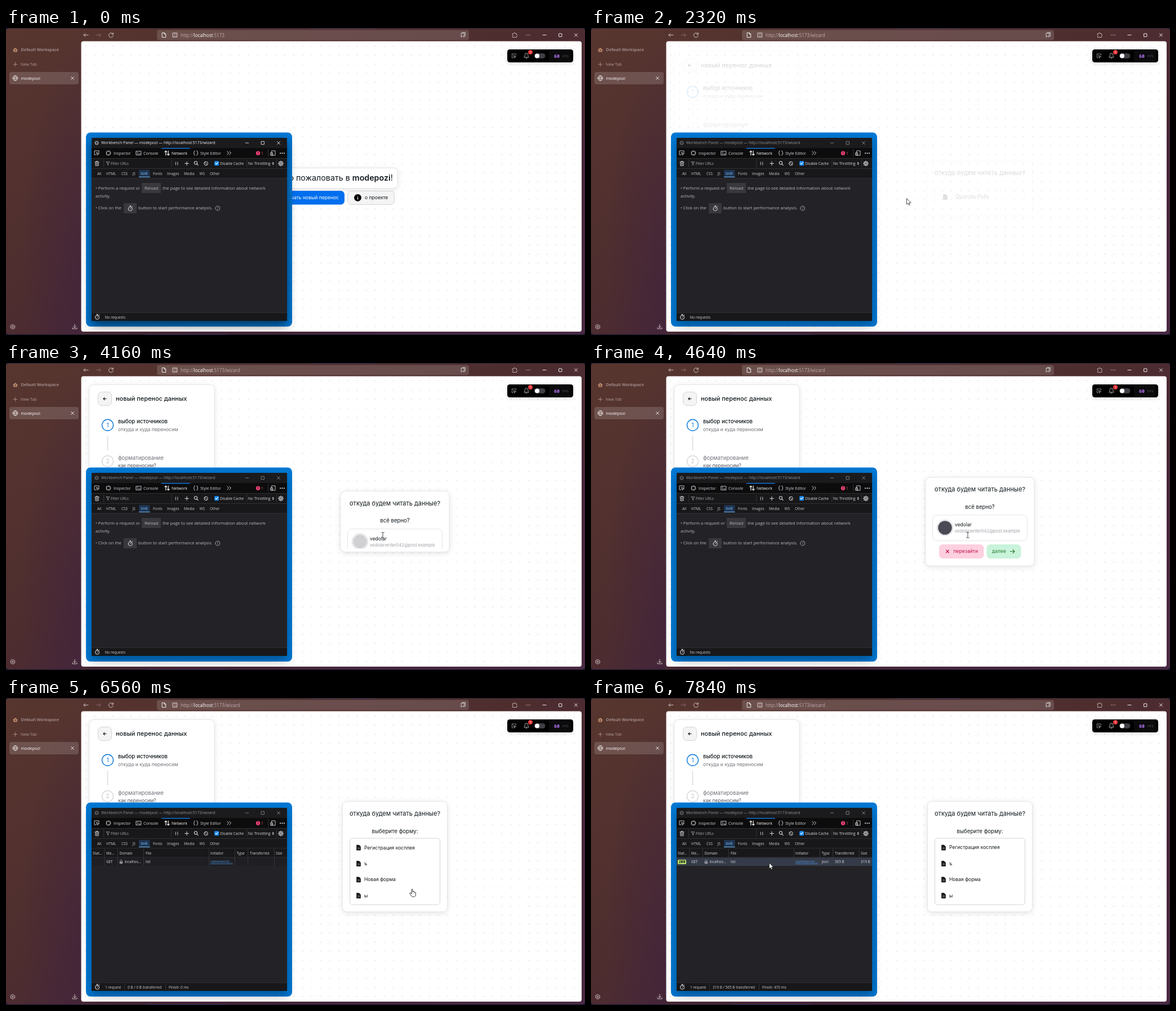
An HTML page for the animation above (8 s loop, 1028 by 545 pixels).

```html
<!DOCTYPE html>
<html lang="ru">
<head>
<meta charset="utf-8">
<style>
html, body { margin: 0; width: 100%; height: 100%; overflow: hidden; background: #1d1b33; }
svg { display: block; }
text { font-family: Inter, sans-serif; white-space: pre; }
text.ui { font-family: "Open Sans", "Noto Sans", sans-serif; }
text.mono { font-family: "Noto Sans Mono", monospace; }
.card { fill: #fff; stroke: #e6e6e9; filter: drop-shadow(0 2px 5px #0000001c); }
</style>
</head>
<body>
<svg id="stage" width="1028" height="545" viewBox="0 0 1028 545"></svg>
<script>
const APP = 'modepozi';
const $ = id => document.getElementById(id);

// Drawing helpers: y of a text is its visual middle
const text = (x, y, size, str, fill = '#11181c', more = '') =>
  `<text x="${x}" y="${y + size * .35}" font-size="${size}" fill="${fill}" ${more}>${str}</text>`;
const ui = (x, y, size, str, fill = '#d7d7db', more = '') => text(x, y, size, str, fill, 'class="ui" ' + more);
const rect = (x, y, w, h, r, fill, more = '') =>
  `<rect x="${x}" y="${y}" width="${w}" height="${h}" rx="${r}" fill="${fill}" ${more}/>`;
const circle = (x, y, r, fill, more = '') => `<circle cx="${x}" cy="${y}" r="${r}" fill="${fill}" ${more}/>`;
const icon = (x, y, d, color = '#d7d7db', w = 1, fill = 'none') =>
  `<path transform="translate(${x} ${y})" d="${d}" fill="${fill}" stroke="${color}" stroke-width="${w}" stroke-linecap="round" stroke-linejoin="round"/>`;
const stroke = (color, w = 1) => `stroke="${color}" stroke-width="${w}"`;
const mid = 'text-anchor="middle"';
const ring = r => `M${-r} 0a${r} ${r} 0 1 0 ${2 * r} 0a${r} ${r} 0 1 0 ${-2 * r} 0`;

const CROSS = 'M-2.5-2.5l5 5m0-5l-5 5', LEFT = 'M4 0h-8m3-3l-3 3l3 3', RIGHT = 'M-4 0h8m-3-3l3 3l-3 3';
const WATCH = ring(3.6) + 'M0 0l1.3-1.5M-1.2-5.2h2.4M0-5v1.3M3-3.6l.8-.8';
const GLOBE = ring(4.3) + 'M-4.3 0h8.6M0-4.3c-2.7 2.7-2.7 6 0 8.6c2.7-2.6 2.7-5.9 0-8.6';
const GEAR = ring(1.6) + ring(3.3) + 'M0-4.6v1.2M0 3.4v1.2M-4.6 0h1.2M3.4 0h1.2M-3.2-3.2l.8.8M2.4 2.4l.8.8M-3.2 3.2l.8-.8M2.4-2.4l.8-.8';
const file = (x, y) => icon(x, y, 'M-3.2-4.4h4l2.6 2.6v6.4h-6.6z', '#18181b', .8, '#18181b')
  + icon(x, y, 'M-1.3.3h3M-1.3 2h3', '#aaa', .7);

const chrome = () => {
  const c = '#d9cccb', dim = '#b09a99';
  return rect(540, 0, 115, 1, 0, '#232c66') + rect(250, 544, 140, 1, 0, '#242a60')
    + rect(0, .8, 1028, 543, 5, 'url(#frame)') + rect(0, .8, 134, 543, 5, 'url(#tint)')
    + icon(16.5, 39, 'M-3.5 0l3.5-3l3.5 3M-2.5 0v3h5v-3', '#c99a7a', 1.2, '#8d5c48')
    + ui(26.5, 38.5, 7.4, 'Default Workspace', dim, 'font-weight="600"')
    + icon(16.5, 64.5, 'M-3.5 0h7M0-3.5v7', dim, .8) + ui(26, 64.5, 7.2, 'New Tab', dim)
    + rect(6, 78, 123, 22, 4, '#ffffff26') + icon(16.5, 89, GLOBE, '#f3ecec', .9)
    + ui(26.5, 89.5, 7.4, APP, '#fff') + icon(118, 89, CROSS, '#f3ecec', .9)
    + icon(12, 530.5, 'M0-4l3.6 2v4l-3.6 2l-3.6-2v-4z' + ring(1.4), c, .9)
    + icon(122, 530, 'M0-4v6m-2.3-2.3l2.3 2.3l2.3-2.3M-4 2v2h8v-2', c, .9)
    + icon(142, 12.5, LEFT, c, .9) + icon(164, 12.5, RIGHT, '#8a6d6d', .9)
    + icon(186.5, 12.5, 'M3.6-1.5a4 4 0 1 0 .3 2.6M3.8-4.2v2.8h-2.8', c, .9)
    + rect(268, 3.5, 554, 18, 4, '#ffffff24')
    + icon(280.5, 12.5, 'M-3-4h3.6l2.6 2.6v5.4h-6.2zM.6-4v2.6h2.6', '#fff', .9)
    + icon(300, 12.5, 'M-3.7-3.7h7.4v7.4h-7.4zM-1.6-1.7h1M1-1.7h.8M-1.6 1.5h1M1 1.5h.8', '#e9dfdf', .9)
    + `<text class="ui" x="310" y="15.9" font-size="8.05" fill="#bfaaaa">http://<tspan fill="#fff">localhost</tspan>:5173<tspan id="path"></tspan></text>`
    + icon(812, 12.5, 'M-3.5-3.5h5v7l-2.5-2l-2.5 2zM-1.5-3.5v-1h5v6.5', '#eee', .8)
    + icon(903, 12.5, 'M-3.5-2.5h2a1.5 1.5 0 0 1 3 0h2v2.2a1.5 1.5 0 0 1 0 2.8v1.5h-7v-2a1.5 1.5 0 0 0 0-2.6z', c, .8)
    + [-3, 0, 3].map(d => circle(927 + d, 12.5, .7, c)).join('')
    + icon(956, 12.5, 'M-3 0h6', '#fff', .9) + rect(981.5, 10, 5.4, 5.4, .5, 'none', stroke('#fff', .9)) + icon(1012, 12.5, CROSS, '#fff', .9)
    + rect(133.5, 23.5, 888.5, 515.5, 4, '#fff') + rect(133.5, 24, 888.5, 515, 4, 'url(#dots)');
};

const home = () =>
  rect(460, 248.5, 235, 36, 7, '', 'class="card"')
  + text(577.5, 266.5, 14.25, `добро пожаловать в <tspan font-weight="600">${APP}</tspan>!`, '#11181c', mid)
  + `<g id="start">${rect(465, 289, 136, 24.5, 6.5, '#006fee')}${text(591, 301, 8.56, 'начать новый перенос', '#fff', 'text-anchor="end"')}</g>`
  + rect(606.5, 289.5, 83, 24, 6.5, '#f4f4f5', stroke('#d4d4d8'))
  + circle(624.5, 301.3, 6.4, '#000') + icon(624.5, 301.3, 'M0-.3v3M0-2.7v.1', '#fff', 1.3)
  + text(637, 301, 8.56, 'о проекте');

const steps = () =>
  rect(148, 38.5, 222, 480, 8, '', 'class="card"')
  + rect(163.5, 51.5, 24, 24, 6.5, '#f4f4f5', stroke('#d4d4d8')) + icon(175.5, 63.5, 'M2.6 0h-5.2m2.2-2.2l-2.2 2.2l2.2 2.2', '#18181b', 1.1)
  + text(195, 63.5, 10.95, 'новый перенос данных', '#11181c', 'font-weight="500"')
  + circle(180.5, 110.3, 10, '#fff', stroke('#0878dc', 1.4)) + text(180.5, 110.3, 10, '1', '#0878dc', mid)
  + text(199, 104, 9.63, 'выбор источников', '#11181c', 'font-weight="500"')
  + text(199, 118, 8.56, 'откуда и куда переносим', '#71717a')
  + rect(180, 130, 1.2, 25, 0, '#d4d4d8')
  + circle(180.5, 174.5, 10, '#fff', stroke('#d9d9de', 1.4)) + text(180.5, 174.5, 10, '2', '#c2c2c8', mid)
  + text(199, 168.5, 9.63, 'форматирование', '#71717a') + text(199, 182.5, 8.56, 'как переносим?', '#52525b');

const toolbar = () =>
  rect(890, 38, 117, 23, 4.5, '#000', 'style="filter:drop-shadow(0 2px 3px #0002)"')
  + icon(902, 49.5, 'M-3.5-3.5h7v2M-3.5-3.5v7h2', '#999', .9) + icon(902, 49.5, 'M-.5-.5l4 1.5l-1.8.7l-.8 1.8z', '#ddd', .7)
  + icon(924, 49.5, 'M-4 2.2c1.5-1.5 1-3 1.3-4.3a2.7 2.7 0 0 1 5.4 0c.3 1.3-.2 2.8 1.3 4.3zM-1 4h2', '#bbb', .9)
  + circle(931, 43, 4, '#e5393f') + text(931, 43, 4.8, '1', '#fff', mid)
  + rect(938, 45, 19.5, 9, 4.5, '#3f3f46') + circle(943, 49.5, 4, '#fff')
  + rect(964, 41, 39, 17.5, 3, '#0b0b0d')
  + text(973, 50, 8.2, '60', '#b673f0', 'id="fps" class="mono" font-weight="700"')
  + text(988, 50, 6, 'FPS', '#55555c', 'class="mono"');

const devtools = () => {
  const line = (x, y, h = 14) => rect(x, y, .8, h, 0, '#3b3b40');
  const filters = { All: 162, HTML: 178, CSS: 205, JS: 224.5, XHR: 239, Fonts: 261, Images: 286, Media: 316, WS: 343.5, Other: 362 };
  return rect(142, 185.5, 366, 344.5, 8, '#0078d4')
    + `<g id="shadow">${rect(152, 203, 347, 325, 4, '#000', 'style="filter:blur(9px)"')}</g>`
    + rect(152, 195, 347, 325, 2, '#232327') + rect(152, 195, 347, 18, 2, '#1b1b1e')
    + `<g id="title">${circle(161, 204, 3.6, '#8a8a8f')}${circle(161, 204, 1.4, '#1b1b1e')}`
    + ui(169, 204, 7, `Workbench Panel — ${APP} — http://localhost:5173/wizard`, '#f4f4f6')
    + icon(428, 204, 'M-2.7 0h5.4', '#fff', .8) + rect(453, 201.3, 5.4, 5.4, .5, 'none', stroke('#fff', .8)) + icon(484, 204, CROSS, '#fff', .8) + '</g>'
    + rect(152, 213, 347, 18, 0, '#0c0c0d') + rect(276, 213, 50.5, 1.2, 0, '#0a84ff')
    + icon(161, 222, 'M4-1v-3h-8v7h3M0-1l4.5 1.8l-2 .8l-.8 2z', '#d7d7db', .9)
    + icon(182, 222, 'M-3-3h6v6h-6zM0-4.3v1M0 3.3v1M-4.3 0h1M3.3 0h1', '#d7d7db', .9) + ui(191, 222.5, 7, 'Inspector')
    + icon(235.5, 222, 'M-4.3-3.2h8.6v6.6h-8.6zM-2.6-1.4l1.7 1.5l-1.7 1.5M.5 1.6h2', '#d7d7db', .9) + ui(244, 222.5, 7, 'Console')
    + icon(286, 222, 'M-2.2 4v-8m-2 2.2l2-2.2l2 2.2M2.2-4v8m-2-2.2l2 2.2l2-2.2', '#fff', 1.1) + ui(294, 222.5, 7, 'Network', '#fff')
    + icon(337, 222, 'M-1.6-3.8c-1.5 0-1.3.7-1.3 2c0 1-.2 1.6-1.2 1.8c1 .2 1.2.8 1.2 1.8c0 1.3-.2 2 1.3 2M1.6-3.8c1.5 0 1.3.7 1.3 2c0 1 .2 1.6 1.2 1.8c-1 .2-1.2.8-1.2 1.8c0 1.3.2 2-1.3 2')
    + ui(345, 222.5, 7, 'Style Editor')
    + icon(396, 222, 'M-3.5-3l3 3l-3 3M.5-3l3 3l-3 3')
    + circle(447.5, 222.3, 3.7, '#eb3f72') + icon(447.5, 222.3, 'M0-1.8v1.8M0 1.6v.1', '#1b1b1e', 1) + ui(453, 222.5, 6.6, '1', '#eb5c86')
    + line(465, 215) + icon(474, 222, 'M-2-4h6v8h-6zM-4-.5h3.5v4.5h-3.5z', '#d7d7db', .9)
    + [-3.4, 0, 3.4].map(d => circle(490.5 + d, 222.3, 1.1, '#d7d7db')).join('')
    + rect(152, 231, 347, 36, 0, '#18181a') + [231, 249, 266.5, 505].map(y => rect(152, y, 347, .8, 0, '#38383d')).join('')
    + icon(161.5, 240.5, 'M-3.5-2.6h7M-1.2-2.8v-1.2h2.4v1.2M-2.8-2.4l.3 6.4h5l.3-6.4M-1-.8v3M1-.8v3', '#d7d7db', .9)
    + line(173, 233) + icon(181, 240.5, 'M-2.8-2.8h5.6l-2.1 2.7v3l-1.4-.8v-2.2z', '#a9a9ad', .8) + ui(186, 240.5, 6.45, 'Filter URLs', '#a9a9ad')
    + line(293.5, 233) + icon(303, 240.5, 'M-1.8-2.5v5M1.8-2.5v5', '#d7d7db', .9) + icon(321, 240.5, 'M-3.3 0h6.6M0-3.3v6.6')
    + icon(337.5, 240, 'M-3.2-.6a2.6 2.6 0 1 0 5.2 0a2.6 2.6 0 1 0-5.2 0M1.3 1.3l2.4 2.4', '#d7d7db', 1.1)
    + icon(355, 240.5, ring(3.3) + 'M-2.3-2.3l4.6 4.6')
    + rect(370, 236.3, 8, 8, 1.5, '#1a8cff') + icon(374, 240.3, 'M-2 0l1.4 1.6l2.7-3.2', '#fff', 1.1) + ui(380, 240.5, 6.45, 'Disable Cache')
    + line(427.5, 233) + ui(430, 240.5, 6.45, 'No Throttling') + icon(474.2, 240.5, 'M-1.4-.8l1.4-1.8l1.4 1.8zM-1.4.8l1.4 1.8l1.4-1.8z', '#d7d7db', .3, '#d7d7db')
    + line(480, 233) + icon(488, 240.5, GEAR, '#d7d7db', 1.1)
    + rect(236, 252, 19.5, 13, 1, '#20344f') + rect(236, 264, 19.5, 1, 0, '#75bfff')
    + Object.entries(filters).map(([k, x]) => ui(x, 258.5, 6.45, k, k == 'XHR' ? '#75bfff' : '#c9c9cd')).join('')
    + `<g id="hint">${ui(159, 284.5, 7.6, '• Perform a request or', '#b9b9bd')}${rect(241, 275, 34, 18, 1, '#38383d')}${ui(246, 284.5, 7.6, 'Reload', '#b9b9bd')}`
    + ui(278, 284.5, 7.6, 'the page to see detailed information about network', '#b9b9bd') + ui(159, 298, 7.6, 'activity.', '#b9b9bd')
    + ui(159, 319, 7.6, '• Click on the', '#b9b9bd') + rect(209, 311, 23, 18, 1, '#38383d') + icon(220.7, 321, WATCH)
    + ui(235, 319, 7.6, 'button to start performance analysis.', '#b9b9bd') + icon(375.7, 320, ring(4), '#b9b9bd', .8) + ui(375.7, 320, 6, '?', '#b9b9bd', mid) + '</g>'
    + '<g id="requests"></g>' + rect(152, 505.8, 347, 14.2, 0, '#18181a') + icon(162, 513.6, WATCH, '#e4e4e8') + '<g id="footer"></g>';
};

const requests = (done, hover) => {
  const cols = { 'Stat...': 154, 'Me...': 178, Domain: 201.5, File: 248, Initiator: 363, Type: 409.5, Transferred: 433, Size: 479 };
  const cells = { GET: 178, 'localhos...': 210.5, list: 248, ...(done && { json: 409.5, '565 B': 433, '319 B': 479 }) };
  const put = (set, y) => Object.entries(set).map(([k, x]) => ui(x, y, 6.3, k)).join('');
  return rect(152, 267.3, 347, 15.7, 0, '#18181a') + rect(152, 282.6, 347, .8, 0, '#38383d')
    + rect(152, 283.4, 347, 14.6, 0, hover ? '#353b48' : '#1f1f23')
    + [174.5, 198, 244, 360, 406, 429, 476].map(x => rect(x, 267.3, .8, 30.7, 0, '#3b3b40')).join('')
    + put(cols, 275.3) + put(cells, 291)
    + rect(201.6, 290, 5.6, 4.2, .8, '#909095') + icon(204.4, 290, 'M-1.6 0v-1.3a1.6 1.6 0 0 1 3.2 0v1.3', '#909095', .9)
    + ui(363, 291, 6.3, 'common.ts:...', '#4f9df5', 'text-decoration="underline"')
    + (done ? rect(154, 287, 15, 8, 1.5, '#b9e36b') + text(161.5, 291, 6.4, '200', '#18181a', 'class="mono" font-weight="600" ' + mid) : '');
};

const footer = (any, done) => {
  const put = (x, s) => ui(x, 513.3, 6.45, s, '#cfcfd3');
  if (!any) return put(175.5, 'No requests');
  const x = done ? 298 : 283;
  return put(176, '1 request') + put(216, (done ? '319 B / 565 B' : '0 B / 0 B') + ' transferred') + put(x + 6, done ? 'Finish: 470 ms' : 'Finish: 0 ms')
    + [210, x].map(v => rect(v, 508, .8, 10, 0, '#3b3b40')).join('');
};

// Contents of the right card, measured from its top edge
const scenes = [
  () => rect(611, 48, 160, 33, 6, '#fff', stroke('#e4e4e7')) + file(629, 64) + text(647, 64, 9.63, 'Quonda Polls'),
  t => {
    const fade = (a, b, low) => `opacity="${t > a && t < b ? low : 1}"`;
    return text(690.5, 52.5, 9.63, 'всё верно?', '#11181c', mid)
      + rect(606.5, 67, 168, 45.5, 8, '#fff', stroke('#e4e4e7'))
      + circle(628.5, 89.5, 14, '#fff', stroke('#c9c9cf')) + circle(628.5, 89.5, 12.3, t < 4480 ? '#d0d0d3' : '#4b4955')
      + text(646, 84.5, 8.56, 'vedolar') + text(646, 95.5, 7.49, 'vedolarwriter042@post.example', '#a1a1aa')
      + `<g ${fade(5020, 5200, .8)}>${rect(618, 119, 79.5, 25, 6.5, '#fdd0df')}${icon(633, 131.5, CROSS, '#c20e4d', 1.1)}${text(643.5, 131.5, 8.56, 'перезайти', '#c20e4d')}</g>`
      + `<g ${fade(5440, 6300, .75)}>${rect(702.5, 119, 61, 25, 6.5, '#c9f3da')}${text(712, 131.5, 8.56, 'далее', '#2c7f35')}${icon(748, 131.5, RIGHT, '#2c7f35', 1.1)}</g>`;
  },
  () => text(690.5, 53, 9.63, 'выберите форму:', '#11181c', mid)
    + rect(610.5, 65.5, 160, 118, 5, '#fff', stroke('#d4d4d8'))
    + ['Регистрация косплея', 'ъ', 'Новая форма', 'ы'].map((s, i) => file(626, 82 + 28.4 * i) + text(636, 82 + 28.4 * i, 8.56, s)).join('')
];

const clamp = v => Math.max(0, Math.min(1, v));
const span = (t, a, b) => clamp((t - a) / (b - a));
const smooth = p => p * p * (3 - 2 * p);

const card = t => {
  const grow = smooth(span(t, 4080, 4380)), list = 1 - (1 - span(t, 6200, 6600)) ** 3;
  const h = 97 + 60 * grow + 39 * list, w = 186 + 7 * span(t, 4040, 4120) - 7 * list, top = 281.5 - h / 2;
  const n = t < 4060 ? 0 : t < 6220 ? 1 : 2;
  const shown = n == 0 ? 1 : n == 1 ? span(t, 4040, 4130) : span(t, 6200, 6400);
  return rect(690.5 - w / 2, top, w, h, 8, '', 'class="card"')
    + text(690.5, top + 21.5, 11, 'откуда будем читать данные?', '#11181c', mid)
    + `<svg y="${top}" width="1028" height="${h - 6}"><g opacity="${shown}">${scenes[n](t)}</g></svg>`;
};

// Pointer route: time, x, y
const route = [[840, 987, 441], [1000, 757, 381], [1160, 650, 342], [1400, 580, 312], [1640, 560, 303], [3000, 560, 303],
  [3200, 600, 340], [3360, 640, 349], [3640, 669, 304], [4880, 669, 304], [5080, 682, 338], [5240, 697, 370], [5400, 716, 362],
  [5640, 721, 339], [7040, 721, 339], [7240, 560, 404], [7400, 450, 385], [7600, 350, 320], [7840, 316, 293]];
const shapes = [[0, 'arrow'], [1720, 'hand'], [2160, 'arrow'], [3600, 'hand'], [4060, 'beam'], [4920, 'arrow'], [5020, 'hand'],
  [5200, 'arrow'], [5480, 'hand'], [7080, 'arrow']];
const pointers = {
  arrow: icon(0, 0, 'M.5 0v10l2.3-2.1l1.6 3.6l1.7-.7l-1.6-3.5h3.1z', '#222', .8, '#fff'),
  hand: icon(0, 0, 'M-1 1c0-1.3 2-1.3 2 0v4.2c0-1 1.8-1 1.8 0v.5c0-1 1.8-1 1.8.1v.6c.2-.9 1.7-.8 1.7.2v3.6c0 2.3-1.3 3.8-3.2 3.8h-1.6c-1.5 0-2.2-.8-3-2l-2.5-4c-.5-1 .8-1.8 1.6-1l1.4 1.5z', '#222', .9, '#fff'),
  beam: icon(0, 1.5, 'M-2.2-5c1.5 0 2.2.3 2.2 1v8c0 .7-.7 1-2.2 1M2.2-5c-1.5 0-2.2.3-2.2 1M0 4c0 .7.7 1 2.2 1', '#333', .9)
};
const place = t => {
  const next = route.findIndex(p => p[0] > t);
  if (next < 1) return (next ? route.at(-1) : route[0]).slice(1);
  const [a, b] = [route[next - 1], route[next]], p = span(t, a[0], b[0]);
  return [a[1] + (b[1] - a[1]) * p, a[2] + (b[2] - a[2]) * p];
};

$('stage').innerHTML = `<defs>
  <linearGradient id="frame" x2="1" y2="1"><stop stop-color="#57362f"/><stop offset=".45" stop-color="#4e2d2f"/><stop offset=".7" stop-color="#472638"/><stop offset="1" stop-color="#4b2a44"/></linearGradient>
  <radialGradient id="tint" cx="1" cy=".82" r=".8"><stop stop-color="#3d2140" stop-opacity=".6"/><stop offset="1" stop-color="#3d2140" stop-opacity="0"/></radialGradient>
  <pattern id="dots" x="133.5" y="24" width="16.06" height="16.06" patternUnits="userSpaceOnUse">${circle(8, 8, 1, '#dedee2')}</pattern></defs>`
  + chrome() + `<g id="home">${home()}</g><g id="wizard">${steps()}<g id="card"></g></g>`
  + toolbar() + devtools() + '<g id="pointer"></g>';

const cache = {};
const fill = (id, html) => { if (cache[id] !== html) $(id).innerHTML = cache[id] = html; };
const attr = (id, name, value) => $(id).setAttribute(name, value);

function draw(t) {
  const [x, y] = place(t), enter = span(t, 2260, 2660);
  const any = t >= 6280, done = t >= 6760, hover = t > 7040 && y < 298 && x < 499;
  fill('path', t < 2160 ? '' : '/wizard');
  attr('home', 'opacity', 1 - span(t, 2160, 2280));
  attr('start', 'opacity', 1 - .2 * span(t, 1480, 1640));
  attr('wizard', 'opacity', enter);
  attr('wizard', 'transform', `translate(0 ${3.5 * (1 - enter)})`);
  fill('card', card(t));
  fill('fps', [4200, 5000, 6280, 7200].some(s => t >= s && t < s + 200) ? '59' : '60');
  attr('title', 'opacity', t < 240 ? 1 : .55);
  attr('shadow', 'opacity', .55 - .25 * span(t, 240, 520));
  attr('hint', 'visibility', any ? 'hidden' : 'visible');
  fill('requests', any ? requests(done, hover) : '');
  fill('footer', footer(any, done));
  fill('pointer', t < 840 ? '' : pointers[shapes.findLast(s => t >= s[0])[1]]);
  attr('pointer', 'transform', `translate(${x} ${y})`);
}

const begin = performance.now();
(function tick() {
  draw((performance.now() - begin) % 8000);
  requestAnimationFrame(tick);
})();
</script>
</body>
</html>
```
